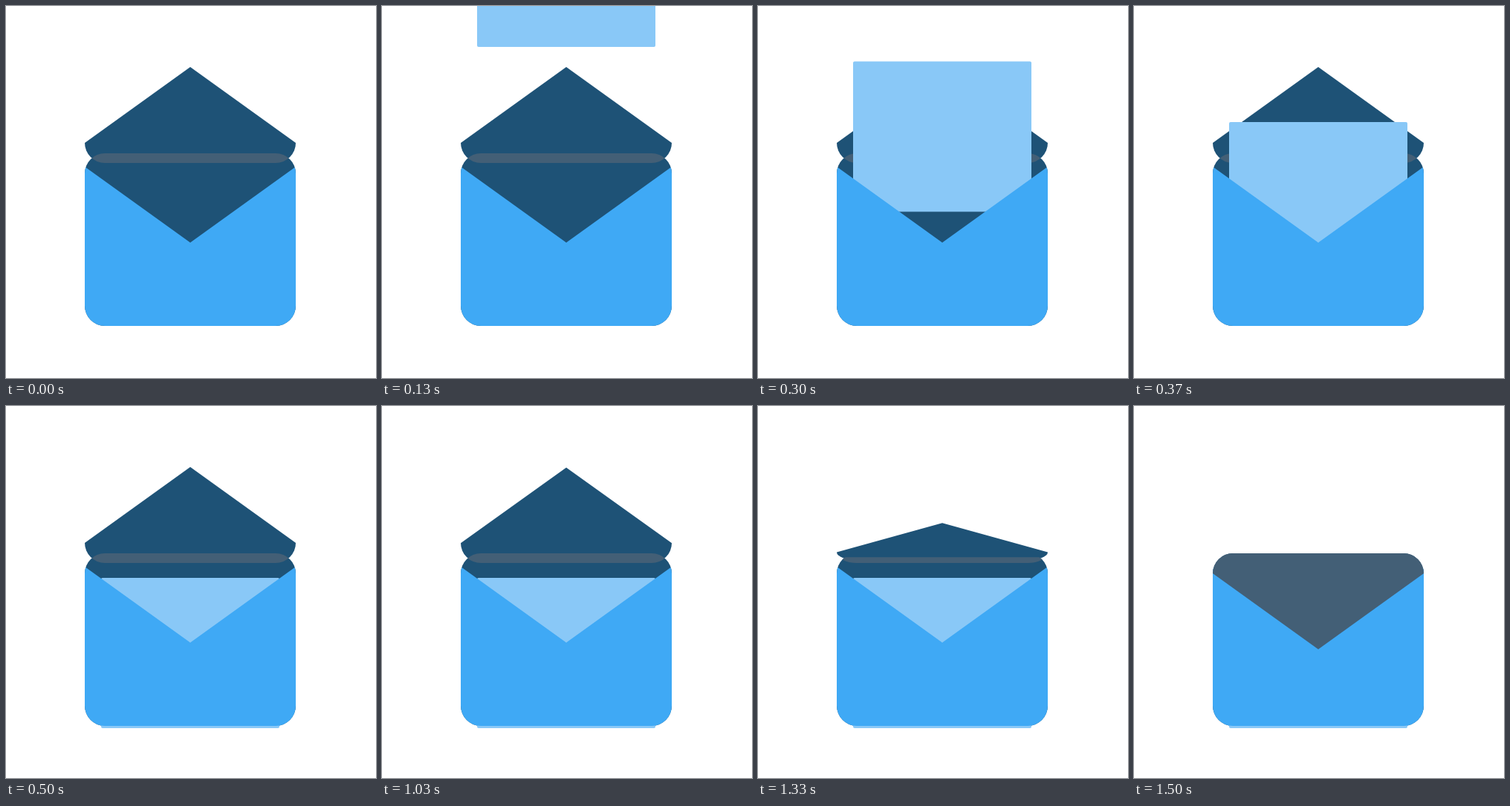
An HTML page for the animation above (2010 ms loop, 498 by 500 pixels).

```html
<!DOCTYPE html>
<html lang="en">
<head>
<meta charset="utf-8">
<title>Envelope</title>
<style>
html, body { margin: 0; width: 100%; height: 100%; overflow: hidden; background: #fff; }
svg { display: block; width: 100vw; height: 100vh; }
</style>
</head>
<body>
<svg viewBox="0 0 498 500">
  <defs>
    <clipPath id="body"><rect x="106" y="198" width="284" height="232" rx="27"/></clipPath>
    <clipPath id="below"><rect id="cut" x="106" width="284" height="60"/></clipPath>
  </defs>
  <rect x="106" y="198" width="284" height="232" rx="27" fill="#1e5276"/>
  <path id="inside" fill="#1e5276"/>
  <g clip-path="url(#body)"><path id="band" fill="#435f76" clip-path="url(#below)"/></g>
  <rect id="letter" x="128" width="240" height="202" rx="2" fill="#89c8f7"/>
  <path d="M106 216L248 318L390 216V440H106Z" fill="#3fa9f5" clip-path="url(#body)"/>
  <path id="outside" fill="#435f76"/>
</svg>
<script>
const LOOP = 2010, STEP = 1000 / 30;
const HINGE = 204.5, BASE = 211, LEFT = 106, RIGHT = 390, R = 27;
const el = id => document.getElementById(id);
const [cut, inside, band, letter, outside] =
  ['cut', 'inside', 'band', 'letter', 'outside'].map(el);
const clamp = v => Math.min(1, Math.max(0, v));
const easeInOut = u => (1 - Math.cos(Math.PI * u)) / 2;

// Rounded edge of the flap, from its right shoulder back to its left one
function roundedEdge(side, base) {
  const ry = Math.abs(base - side), sweep = base > side ? 1 : 0;
  const arc = `A${R} ${ry} 0 0 ${sweep}`;
  return `${arc} ${RIGHT - R} ${base}H${LEFT + R}${arc} ${LEFT} ${side}Z`;
}

function flapPath(s) {
  const y = d => HINGE - d * s;
  return `M${LEFT} ${y(20.5)}L248 ${y(122.5)}L${RIGHT} ${y(20.5)}` +
    roundedEdge(y(20.5), y(-6.5));
}

function draw(time) {
  // The picture advances thirty times a second
  const t = Math.floor((time + 5) / STEP) * STEP;

  const drop = easeInOut(clamp(t / 500));
  letter.setAttribute('y', 231 - 453 * (1 - drop));

  // The flap turns steadily, then snaps shut
  const u = clamp((t - 1000) / 500);
  const angle = 96 * u + 84 * u ** 8;
  const s = Math.cos(angle * Math.PI / 180);
  const open = s > 0, side = HINGE - 20.5 * s;
  inside.setAttribute('d', open ? flapPath(s) : '');
  outside.setAttribute('d', open ? '' : flapPath(s));
  band.setAttribute('d', open ? `M${LEFT} ${side}H${RIGHT}` + roundedEdge(side, BASE) : '');
  cut.setAttribute('y', BASE - 13 * Math.max(0, s) ** 0.55);
}

const start = performance.now();
function tick() {
  draw((performance.now() - start) % LOOP);
  requestAnimationFrame(tick);
}
tick();
</script>
</body>
</html>
```
